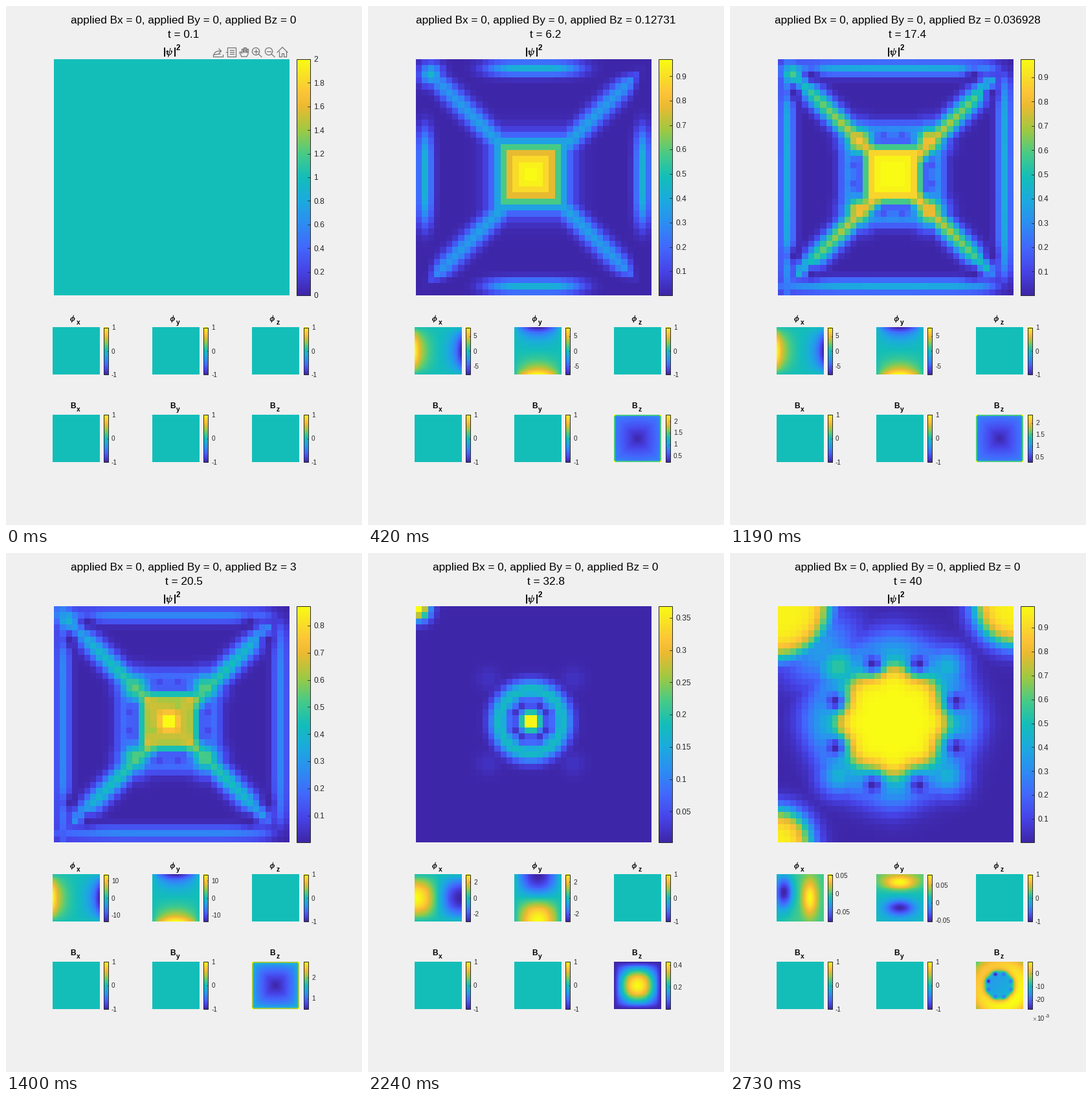
A matplotlib script for the animation above (2800 ms loop, 550 by 800 pixels).

```python
import numpy as np
import matplotlib
import matplotlib.pyplot as plt
from matplotlib.animation import FuncAnimation
from matplotlib.colors import LinearSegmentedColormap
from matplotlib.patches import Rectangle
from matplotlib.patheffects import withStroke

W, H, DPI = 550, 800, 100
N, FRAMES, STEP_MS = 39, 40, 70
matplotlib.rcParams["mathtext.fontset"] = "cm"
matplotlib.rcParams["font.family"] = "Liberation Sans"

HUES = ("#3e26a8 #4743e7 #4367fd #2d8cf3 #1caadf #13beb9 "
        "#48cb86 #9fc942 #eaba31 #fad42e #f9fb15").split()
stops = list(zip(np.linspace(0, 1, len(HUES)), HUES))
stops.insert(9, (.86, "#fec438"))
PARULA = LinearSegmentedColormap.from_list("parula", stops)

# ---------- field shapes ----------
idx = np.arange(N)
X, Y = np.meshgrid(idx - 18.5, idx - 18.5)
CHEB = np.maximum(abs(X), abs(Y))
U, V = np.meshgrid(np.linspace(-1, 1, N), np.linspace(-1, 1, N))
UV = np.maximum(abs(U), abs(V))
BORDER = UV > .99
CORNER = np.minimum(abs(U), abs(V)) > .99


def drop(r, mid, w):
    """Smooth step from 1 down to 0 around mid."""
    return 1 / (1 + np.exp((r - mid) / w))


def bell(r, w):
    return np.exp(-(r / w) ** 2)


def bump(x, y, w):
    return bell(np.hypot(X - x, Y - y), w)


def blob(x, y, wx, wy):
    return bell(U - x, wx) * bell(V - y, wy)


def mirror(x, y, c=0):
    return [(sx * x + c, sy * y + c) for sx in (-1, 1) for sy in (-1, 1)]


def ring_of_eight(near, far, c=0):
    return mirror(near, far, c) + mirror(far, near, c)


def punch(img, points, w):
    for x, y in points:
        img = img * (1 - bump(x, y, w))
    return img


def layer(*parts):
    return np.maximum.reduce(parts)


def dots(amp, points, w):
    return layer(*[amp * bump(x, y, w) for x, y in points])


def fit(img, lo, hi):
    return lo + (hi - lo) * (img - img.min()) / np.ptp(img)


def edges(amp, span):
    depth = np.minimum(idx, N - 1 - idx)
    along = np.exp(-(abs(idx - 19) / span) ** 4)
    side = amp * np.outer(along, bell(depth - 1, 1.25))
    return layer(side, side.T)


def arms(level, fall, width):
    """Diagonal ridges, centred on the middle cell."""
    a, b = abs(X - .5), abs(Y - .5)
    far = np.maximum(a, b)
    end = drop(far + .02 * (X + Y), 16.8, .4)
    return bell(a - b, width) * (level - fall * far) * end


def cross_thin():
    return layer(drop(CHEB, 4.9, 1.1), arms(.4, .005, 2.3), edges(.42, 8),
                 .45 * bump(-16.5, -16.5, 1.8))


def cross_bright():
    return layer(drop(CHEB, 4.3, .7), arms(.93, .022, 2.5), edges(.44, 8.5),
                 edges(.16, 14), .6 * bump(-16.5, -16.5, 2))


def cross_pockets():
    box = .36 * drop(CHEB, 8.5, .5)
    box = punch(box, ring_of_eight(1.6, 5.5), 1.3)
    img = layer(box, drop(CHEB, 4.7, .55), edges(.4, 22),
                arms(.93, .025, 2.4), dots(.85, mirror(5.8, 5.8, .25), 2.6),
                .6 * bump(-16.5, -16.5, 2))
    img = punch(img, ring_of_eight(13.3, 16.3), 1.3)
    return punch(img, [(19.5, 19.5), (19.5, -18.5)], 3)


def core_square():
    r = (X ** 4 + Y ** 4) ** .25
    img = bell(r, 1.6) + .28 * bell(r - 4.2, 1.4)
    img = punch(img, [(1.5, -2.5), (-2.5, 1.5)], .8)
    img = img + dots(.12, mirror(3.4, 3.4), 1)
    return layer(img, .45 * bump(-18.5, -18.5, 1.9),
                 dots(.07, mirror(5.9, 5.9), 2.2))


def core_ring():
    r = np.hypot(X, Y)
    img = layer(bell(r, 1.8), .42 * bell(r - 5.2, 1.7),
                .2 * drop(r, 6.3, .3))
    img = punch(img, ring_of_eight(1.2, 2.7), .7)
    return layer(img, .87 * bump(-18.5, -18.5, 1.8),
                 dots(.04, mirror(7, 7), 2))


def flower():
    x, y = X - .2, Y - .2
    r = np.hypot(x, y) - .35 * np.cos(8 * np.arctan2(y, x)) + .03 * (x + y)
    img = .62 * drop(r, 8.6, .8) + .4 * drop(r, 14, 1.3)
    img = layer(img, dots(.45, mirror(8.8, 8.8), 3.5),
                .57 * bump(-9, -9, 4), .36 * bump(-12, -12, 6.5))
    img = punch(img, ring_of_eight(3.75, 10, .5), 1.5)
    for cx, cy, size in ((-19, -19, 8.5), (20, -19, 6.3), (-19, 20, 5.3)):
        img = layer(img, drop(np.hypot(X - cx, Y - cy), size, 1))
    return img


def dipole(s, p):
    """Odd profile s along x, arched along y."""
    return -s * np.cos(.47 * np.pi * V) ** p


def late_x():
    return (blob(.42, 0, .32, .8) - 1.2 * blob(-.68, -.25, .36, .65)
            - .3 * blob(-1, 0, .5, 1.2))


def late_y():
    return (blob(0, -.65, .7, .3) + .35 * blob(0, -1, 1.5, .5)
            - blob(0, .42, .6, .3) - .3 * blob(0, .6, 1, .7))


def framed(img, border, corner):
    return np.where(CORNER, corner, np.where(BORDER, border, img))


def well():
    r = .5 * UV + .5 * np.hypot(U, V) / 1.41
    return framed(.3 * r, .6, 1)


def dome():
    return framed(.66 + .3 * UV ** 1.3, .44, 0)


def bowl():
    r = (U ** 4 + V ** 4) ** .25
    return framed(.5 * r ** 1.4 + .2 * np.exp((UV - 1) * 12), .84, 1)


def arch():
    return np.cos(U * np.pi / 2) * np.cos(V * np.pi / 2)


def remnant():
    r = np.hypot(U, V)
    img = .9 - .5 * (r - .85) ** 2 * (r > .85) + .04 * (U + V)
    img = img - .4 * drop(r, .62, .06)
    for x, y in ring_of_eight(.19, .5):
        img = img - (.36 if x + y < -.5 else .2) * blob(x, y, .09, .09)
    return img


# ---------- key states ----------
KEYS = [0, 6, 10, 17, 24, 32, 39]
flat = np.zeros((N, N))

PSI = [flat + 1, fit(cross_thin(), .002, .97), fit(cross_bright(), .002, .97),
       fit(cross_pockets(), .002, .975), fit(core_square(), .002, .686),
       fit(core_ring(), .002, .368), fit(flower(), .002, .99)]

steep = dipole(np.sinh(2.6 * U) / np.sinh(2.6), 1)
broad = dipole(np.sin(1.6 * U), 1.2)
PHI = [amp * steep for amp in (0, 7.85, 6.3, 7.85, 23.9)] + [2.95 * broad]
PHI_X = PHI + [fit(late_x(), -.077, .053)]
PHI_Y = [-p.T for p in PHI] + [fit(late_y(), -.053, .08)]

B_Z = [flat, fit(well(), .23, 2.28), fit(dome(), -1.16, .76),
       fit(well(), .28, 2.36), fit(bowl(), .86, 3.46),
       fit(arch(), .001, .43), fit(remnant(), -.027, .0087)]


# ---------- motion ----------
def clock_time(i):
    return (1 + 399 * i // 39) / 10


def drive(t):
    """Oscillates, holds a plateau, then switches off."""
    if 1 < t < 20:
        return 3.114961 * np.sin(np.pi * (.8124575 * t - .102034)) ** 2
    return 3 if 20 < t < 30.5 else 0


def ease_out(s):
    return 1 - (1 - np.clip(s, 0, 1)) ** 2


def locate(i):
    k = min(np.searchsorted(KEYS, i, side="right") - 1, len(KEYS) - 2)
    return k, (i - KEYS[k]) / (KEYS[k + 1] - KEYS[k])


def logit(p):
    return np.log(p / (1 - p))


def density(i):
    k, s = locate(i)
    a, b = PSI[k], PSI[k + 1]
    if k == 5:  # regrowth is exponential, then saturates
        return 1 / (1 + np.exp(-(1 - s) * logit(a) - s * logit(b)))
    if k == 0:  # decay enters from the rim
        s = np.clip(2.5 * s - 1.5 * (1 - CHEB / 19.5), 0, 1)
    elif k == 3:
        s = ease_out((i - 19) / 5)
    return a + (b - a) * s


def field(keys, i):
    k, s = locate(i)
    if k == 0:
        s = s ** .5
    elif k == 3:
        s = ease_out((i - 19) / 5)
    elif k == 4:
        s = ease_out((i - 29) / 3)
    elif k == 5:
        s = (1 - np.exp(-4 * s)) / (1 - np.exp(-4))
    return keys[k] + (keys[k + 1] - keys[k]) * s


# ---------- stage ----------
fig = plt.figure(figsize=(W / DPI, H / DPI), dpi=DPI, facecolor="#f0f0f0")
ax = fig.add_axes([0, 0, 1, 1])
ax.axis("off")


def label(x, y, s, px, **kw):
    return ax.text(x, y, s, fontsize=px * 72 / DPI, va="baseline", **kw)


def greek(x, y, s, px):
    t = label(x, y, s, px, ha="center")
    t.set_path_effects([withStroke(linewidth=.25, foreground="black")])


def picture(img, x, y, w, h):
    return ax.imshow(img, cmap=PARULA, extent=(x, x + w, y + h, y),
                     aspect="auto", interpolation="nearest")


def stroke(xs, ys, color="#262626", lw=.6):
    return ax.plot(xs, ys, color=color, lw=lw)[0]


def tick_values(lo, hi, most):
    for e in range(-5, 4):
        for m in (1, 2, 5):
            step = m * 10.0 ** e
            if (hi - lo) / step <= most + 1e-6:
                first = np.ceil(lo / step - 1e-6)
                last = np.floor(hi / step + 1e-6)
                return np.arange(first, last + 1) * step
    return np.array([])


class Panel:
    def __init__(self, x, y, size, bar, bar_w, label_x, px, most, notch):
        self.y, self.size, self.px, self.most = y, size, px, most
        self.edge, self.notch = bar + bar_w, notch
        self.img = picture(flat, x, y, size, size)
        ramp = picture(np.linspace(1, 0, 256)[:, None], bar, y, bar_w, size)
        ramp.set_clim(0, 1)
        ax.add_patch(Rectangle((bar, y), bar_w, size, fill=False,
                               ec="#262626", lw=.7))
        self.marks = stroke([], [])
        self.labels = [label(label_x, 0, "", px, color="#262626")
                       for _ in range(12)]

    def show(self, data):
        lo, hi, most = data.min(), data.max(), self.most
        if hi - lo < 1e-9:
            lo, hi = lo - 1, hi + 1
            most = most if most > 5 else 2
        self.img.set_data(data)
        self.img.set_clim(lo, hi)
        milli = max(abs(lo), abs(hi)) < .05
        values = tick_values(lo, hi, most)
        ys = self.y + self.size * (hi - values) / (hi - lo)
        xs, ms = [], []
        for t in self.labels:
            t.set_text("")
        for t, v, y in zip(self.labels, values, ys):
            t.set_text(f"{round(v * (1e3 if milli else 1), 6) + 0:g}")
            t.set_y(y + .36 * self.px)
            xs += [self.edge - self.notch, self.edge, np.nan]
            ms += [y, y, np.nan]
        self.marks.set_data(xs, ms)
        return milli


main = Panel(73.5, 82, 364, 448.5, 21, 475, 12, 10, 3.5)
columns = ((71.6, 151.4, 163), (226, 305.4, 317.3), (380, 460.4, 472))
small = [[Panel(x, y, 72.7, bar, 6.6, lx, 10, 4.2, 1.2)
          for x, bar, lx in columns] for y in (495.7, 630.2)]

title = label(274.5, 27, "", 17.3, ha="center")
clock = label(274.5, 49, "", 17.3, ha="center")
for x in (244.5, 260.5):
    label(x, 75.5, "|", 14.7, weight="bold", ha="center")
greek(252.7, 75.5, r"$\psi$", 15)
label(266.3, 68.3, "2", 11.7, weight="bold", ha="center")
for (x, _, _), axis in zip(columns, "xyz"):
    greek(x + 32, 485.5, r"$\phi$", 12.5)
    label(x + 40, 491, axis, 10.3, weight="bold", ha="center")
    label(x + 32, 619.5, "B", 12, weight="bold", ha="center")
    label(x + 40, 625, axis, 10.3, weight="bold", ha="center")

power = [label(467.5, 721, "×", 10, color="#777777"),
         label(474.5, 721, "10", 10, color="#262626"),
         label(486.5, 716, "-3", 8, color="#262626")]


# ---------- toolbar ----------
def toolbar():
    parts = []

    def pen(*pts):
        xs, ys = zip(*pts)
        parts.append(stroke(xs, ys, color="#747474", lw=.9))

    def lens(cx, plus):
        a = np.linspace(0, 2 * np.pi, 40)
        pen(*zip(cx + 5.6 * np.cos(a), 70 + 5.6 * np.sin(a)))
        pen((cx + 4, 74), (cx + 9, 78.5))
        pen((cx - 3, 70), (cx + 3, 70))
        if plus:
            pen((cx, 67), (cx, 73))

    def hand(cx):
        pen((cx - 4, 78), (cx - 7, 72), (cx - 6, 70.5), (cx - 3.5, 73))
        for k, top in enumerate((66, 64, 64, 66)):
            x = cx - 4 + 2.6 * k
            pen((x, 71), (x, top), (x + 2, top), (x + 2, 71))
        pen((cx + 6, 71), (cx + 6, 74), (cx + 4, 78), (cx - 4, 78))

    pen((320, 75), (320, 78), (335, 78), (335, 75))
    pen((331, 74), (321, 75), (323, 71.5), (327, 69.5), (332, 69.5))
    pen((329, 66), (332.5, 69.5), (329, 73))
    pen((340, 71), (342, 71), (342, 64), (355, 64), (355, 78), (342, 78),
        (342, 71))
    for y in (68, 71, 74):
        pen((345.5, y), (352, y))
    hand(368)
    lens(386, True)
    lens(406, False)
    pen((419, 71.5), (427, 63.5), (435, 71.5))
    pen((421.5, 70), (421.5, 78), (425.5, 78), (425.5, 73), (429, 73),
        (429, 78), (433, 78), (433, 70))
    return parts


tools = toolbar()
ax.set_xlim(0, W)
ax.set_ylim(H, 0)


def draw(i):
    t = clock_time(i)
    title.set_text("applied Bx = 0, applied By = 0, "
                   f"applied Bz = {drive(t):.5g}")
    clock.set_text(f"t = {t:g}")
    main.show(density(i))
    rows = ((field(PHI_X, i), field(PHI_Y, i), flat),
            (flat, flat, field(B_Z, i)))
    milli = False
    for panels, images in zip(small, rows):
        for panel, img in zip(panels, images):
            milli = panel.show(img)
    for part in power:
        part.set_visible(bool(milli))
    for part in tools:
        part.set_visible(i == 0)
    return []


anim = FuncAnimation(fig, draw, frames=FRAMES, interval=STEP_MS, repeat=True)
plt.show()
```
